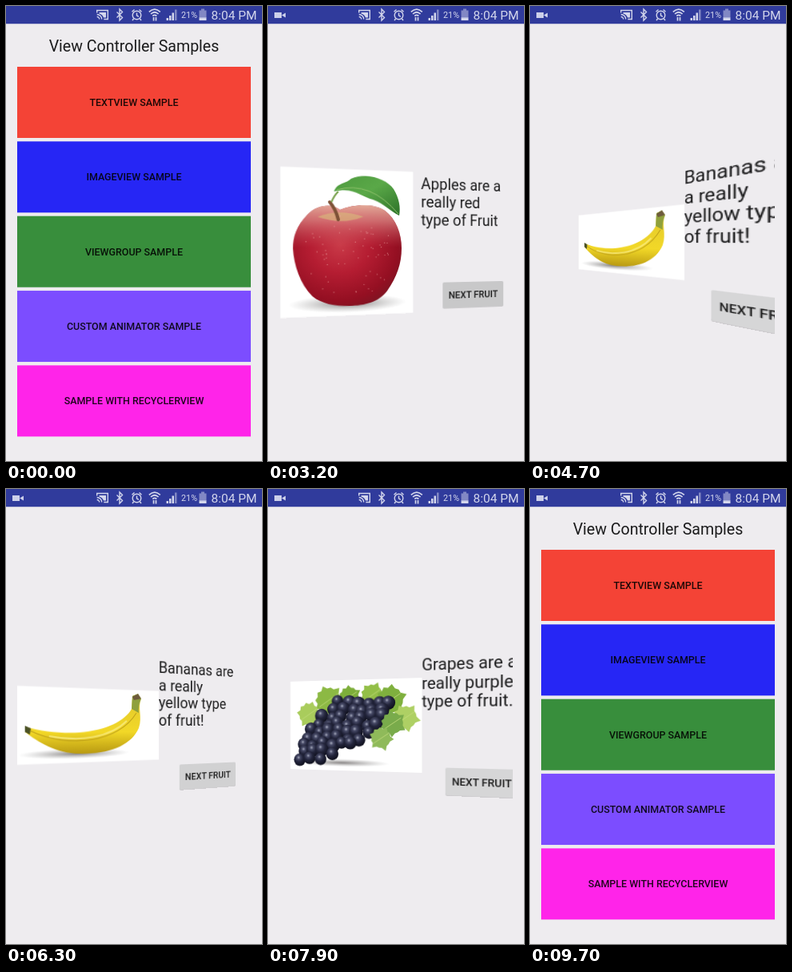
An HTML page for the animation above (9800 ms loop, 320 by 569 pixels).

```html
<!DOCTYPE html>
<html lang="en">
<head>
<meta charset="utf-8">
<title>View Controller Samples</title>
<style>
  html, body { margin: 0; width: 320px; height: 569px; overflow: hidden; background: #eeecef; }
  body { position: relative; font-family: Roboto, sans-serif; }
  svg { position: absolute; left: 0; top: 0; display: block; }
  text { fill: #1b1b1c; font-family: Roboto, sans-serif; font-size: 19.56px; }
  .caps { font-size: 12.44px; font-weight: 500; text-anchor: middle; fill: rgba(0, 0, 0, .88); }
  #scene { position: absolute; left: 0; top: 22px; width: 320px; height: 547px; background: #eeecef; }
  #clip { position: absolute; left: 14px; top: 14px; width: 292px; height: 519px; overflow: hidden; perspective: 128px; }
  #group { position: absolute; inset: 0; }
  .press { opacity: var(--press, 0); }
  #status text { fill: #d3d6ec; }
</style>
</head>
<body>
<svg id="menu" width="320" height="569"></svg>
<div id="scene"><div id="clip"><div id="group"></div></div></div>
<svg id="status" width="320" height="23">
  <defs>
    <radialGradient id="red" cx=".42" cy=".4" r=".68">
      <stop offset="0" stop-color="#c93a48"/><stop offset=".4" stop-color="#b51d32"/>
      <stop offset=".8" stop-color="#940f22"/><stop offset="1" stop-color="#7a1522"/>
    </radialGradient>
    <linearGradient id="gloss" x2="0" y2="1">
      <stop offset="0" stop-color="#eab9a4" stop-opacity=".9"/><stop offset=".16" stop-color="#df8c88" stop-opacity=".7"/>
      <stop offset=".42" stop-color="#d05560" stop-opacity="0"/>
    </linearGradient>
    <linearGradient id="green" x2="1" y2="1">
      <stop offset="0" stop-color="#4d9a3e"/><stop offset=".45" stop-color="#5aa848"/><stop offset="1" stop-color="#2c7128"/>
    </linearGradient>
    <linearGradient id="yellow" x2="0" y2="1">
      <stop offset="0" stop-color="#b9b33c"/><stop offset=".2" stop-color="#e6cc2c"/>
      <stop offset=".65" stop-color="#f2d827"/><stop offset="1" stop-color="#b99a12"/>
    </linearGradient>
    <radialGradient id="grape" cx=".4" cy=".32" r=".7">
      <stop offset="0" stop-color="#a9adc0"/><stop offset=".2" stop-color="#474a66"/>
      <stop offset=".5" stop-color="#23253c"/><stop offset="1" stop-color="#0d0e1a"/>
    </radialGradient>
    <radialGradient id="shade">
      <stop offset="0" stop-color="#55504f" stop-opacity=".7"/><stop offset="1" stop-color="#888" stop-opacity="0"/>
    </radialGradient>
  </defs>
  <rect width="320" height="22.250" fill="#303b9c"/>
  <path id="camera" fill="#ccd0ea" d="M8 8h9v7H8zM17 11.500l5-3v6z"/>
  <g fill="none" stroke="#d3d6ec" stroke-width="1.400">
    <path d="M113.700 8.500V5.500h13.600v11h-5M113.700 10.500a6 6 0 0 1 6 6M113.700 13.500a3 3 0 0 1 3 3"/>
    <path d="M138.500 7.500l7 7-3.500 3.500V4l3.500 3.500-7 7"/>
    <circle cx="163.500" cy="11.500" r="5.300"/>
    <path d="M163.500 8.500v3.300l2.300 1.500M157.500 7.300l3-2.800M169.500 7.300l-3-2.800M159.500 16l-1.500 2M167.500 16l1.500 2"/>
    <path stroke-width="1.700" d="M178.800 7.300q7-6.500 14 0M181 10q4.800-4.500 9.600 0M183.300 12.500q2.500-2.200 5 0M184.500 18.500v-4.500M187.500 14v4.500"/>
  </g>
  <g fill="#d3d6ec">
    <path d="M116.500 8h8.500v6.500h-3q-1.500-4-5.500-5z"/>
    <path d="M200.500 15h2.500v3h-2.500zM204 12h2.500v6H204zM207.500 8.500h2.500V18h-2.500z"/>
    <path d="M211 4.500h2.500V18H211z" opacity=".5"/>
    <path d="M244 3.500h4v2h2.500v9.500h-9V5.500h2.500z" opacity=".5"/>
    <path d="M241.500 14.500h9V18h-9z"/>
  </g>
  <text x="219" y="15" style="font-size:10.800px">21%</text>
  <text x="256.600" y="17.200" style="font-size:15.500px">8:04 PM</text>
</svg>
<script>
const $ = id => document.getElementById(id);
const clamp = x => Math.min(1, Math.max(0, x));
const LOOP = 9800;

let seed = 11;
const random = () => (seed = seed * 16807 % 2147483647) / 2147483647;

// Menu
const samples = [
  ['TEXTVIEW SAMPLE', '#f44336'],
  ['IMAGEVIEW SAMPLE', '#2626f5'],
  ['VIEWGROUP SAMPLE', '#388e3c'],
  ['CUSTOM ANIMATOR SAMPLE', '#7c4dff'],
  ['SAMPLE WITH RECYCLERVIEW', '#ff24e9'],
];
$('menu').innerHTML =
  '<text x="160" y="57" text-anchor="middle">View Controller Samples</text>' +
  samples.map(([label, color], i) => {
    const y = 76 + i * 93.35;
    return `<rect x="14" y="${y}" width="292" height="89" fill="${color}"/>
      <text class="caps" x="160" y="${y + 49}">${label}</text>`;
  }).join('');

// Fruit pictures
const shadow = (x, y, rx, ry) => `<ellipse cx="${x}" cy="${y}" rx="${rx}" ry="${ry}" fill="url(#shade)"/>`;

function apple() {
  const body = 'M92 256C84 249 66 249 54 263C42 276 38 289 38 303C39 322 46 345 60 360C70 369 86 373 103 373' +
    'C122 373 138 370 149 356C161 339 167 322 167 303C167 285 160 266 146 256C132 247 108 249 92 256Z';
  let specks = '';
  for (let i = 0; i < 60; i++) {
    const a = random() * 6.283, r = Math.sqrt(random()) * 54;
    specks += `<circle cx="${102 + r * Math.cos(a)}" cy="${311 + r * Math.sin(a)}" r=".7"/>`;
  }
  return shadow(103, 370, 70, 11) +
    `<path fill="url(#red)" d="${body}"/>
    <path fill="url(#gloss)" d="${body}"/>
    <path fill="#d9b47c" opacity=".7" d="M66 265Q90 254 120 264Q95 275 66 265Z"/>
    <g fill="#e9a3a0" opacity=".6">${specks}</g>
    <path fill="none" stroke="#7d5136" stroke-width="4" stroke-linecap="round" d="M90 268Q87 255 80 247"/>
    <path fill="none" stroke="#77a04b" stroke-width="2" d="M82 247Q85 239 90 234"/>
    <path fill="url(#green)" d="M85 234C89 223 98 225 105 218C122 209 148 216 157 229C164 240 166 252 164 262C152 256 146 248 132 243C116 239 108 228 85 234Z"/>
    <path fill="none" stroke="#8cc069" d="M88 232Q128 219 163 260"/>`;
}

function banana() {
  return shadow(92, 329, 62, 6) +
    `<path fill="url(#yellow)" d="M37 297C55 303 75 305 95 304C125 302 149 290 157 275L158 259L165 256L169 262C164 273 171 285 166 299C157 320 130 331 95 329C69 328 50 314 37 303Z"/>
    <path fill="#8fa03c" d="M157 275L158 259L165 256L169 262Q165 271 166 280Z"/>
    <path fill="#6d5a3c" d="M158 260L165 256L169 262L160 264Z"/>
    <path fill="#4b5226" d="M37 296L43 299L42 306L37 303Z"/>
    <path fill="none" stroke="#c3a51c" stroke-width="1.2" d="M43 302C80 322 140 318 163 280"/>
    <path fill="none" stroke="#fbee8a" stroke-width="2" opacity=".7" d="M62 308C95 315 130 311 151 290"/>`;
}

function leaf(x, y, size, turn, color) {
  let points = '';
  for (let i = 0; i < 22; i++) {
    const a = i * Math.PI / 11, r = size * (i % 2 ? .75 : .9 + .15 * Math.cos(a * 5));
    points += `${x + r * Math.cos(a + turn)},${y + r * Math.sin(a + turn)} `;
  }
  return `<polygon points="${points}" fill="${color}"/>
    <path stroke="#c3dc7d" stroke-width=".8" d="M${x - size * .6} ${y + size * .4}L${x + size * .6} ${y - size * .4}"/>`;
}

function grapes() {
  let balls = '';
  for (let row = 0; row < 9; row++) {
    const k = row / 8, left = 30 + 54 * (1 - k) ** 2, right = 152 - 86 * k * k;
    for (let x = left + row % 2 * 5; x < right; x += 13)
      balls += `<circle cx="${x + random() * 5}" cy="${264 + row * 9 + random() * 6}" r="${7.8 + random() * 1.6}" fill="url(#grape)"/>`;
  }
  return shadow(90, 344, 62, 5) +
    leaf(72, 263, 21, .3, '#8cb944') + leaf(45, 281, 18, 1, '#a9cc5c') + leaf(100, 259, 16, .6, '#7dae3a') +
    leaf(130, 257, 17, 0, '#93bf48') + leaf(153, 264, 21, .8, '#7fb03e') + leaf(172, 286, 18, .2, '#aed064') +
    balls +
    leaf(156, 293, 17, .5, '#79ab4b') + leaf(141, 312, 16, 1.2, '#8fba5a');
}

const fruits = [
  [apple, 24, 181.5, 206.5, 384.5, ['Apples are a', 'really red', 'type of Fruit']],
  [banana, 24.5, 192, 251.5, 339.5, ['Bananas are', 'a really', 'yellow type', 'of fruit!']],
  [grapes, 18.5, 192, 237, 354, ['Grapes are a', 'really purple', 'type of fruit.']],
];
$('group').innerHTML = fruits.map(([draw, left, right, top, bottom, lines]) =>
  `<svg width="292" height="519" viewBox="14 36 292 519">
    <rect x="${left}" y="${top}" width="${right - left}" height="${bottom - top}" fill="#fff"/>
    ${draw()}
    ${lines.map((line, i) => `<text x="191.700" y="${227.7 + i * 22.9}">${line}</text>`).join('')}
    <rect x="220" y="347.700" width="83" height="33" rx="2" fill="#000" opacity=".18"/>
    <rect x="220" y="347" width="83" height="33" rx="2" fill="#d6d6d7"/>
    <rect class="press" x="220" y="347" width="83" height="33" rx="2"/>
    <text class="caps" x="261.500" y="368">NEXT FRUIT</text>
  </svg>`).join('');
const pages = [...$('group').children];

// Each flip turns one page out to 90 degrees, then the next one in from -90.
const flips = [
  { start: 2993, half: 1090, press: 2750, hold: 650 },
  { start: 6029, half: 1041, press: 5850, hold: 500 },
];

function draw(t) {
  $('camera').style.display = t < 100 ? 'none' : '';

  const opening = clamp((t - 1150) / 350), closing = clamp((t - 9180) / 400);
  const shift = 44 * ((1 - opening) ** 3 + closing ** 2);
  const scene = $('scene').style;
  scene.opacity = clamp(opening * 1.7) * (1 - clamp(closing * 1.5 - .4));
  scene.transform = `translateY(${shift}px)`;

  let page = 0, angle = 0, press = 0;
  for (const { start, half, press: down, hold } of flips) {
    const u = Math.min(2, Math.max(0, (t - start) / half));
    if (u >= 1) page++;
    angle += u < 1 ? 90 * u * u : -90 * (2 - u) ** 2;
    press += .08 * Math.sin(Math.PI * clamp((t - down) / hold));
  }
  pages.forEach((svg, i) => svg.style.display = i === page ? '' : 'none');
  $('group').style.transform = `rotateY(${angle}deg)`;
  $('group').style.setProperty('--press', press);
}

function frame() {
  draw(performance.now() % LOOP);
  requestAnimationFrame(frame);
}
frame();
</script>
</body>
</html>
```
